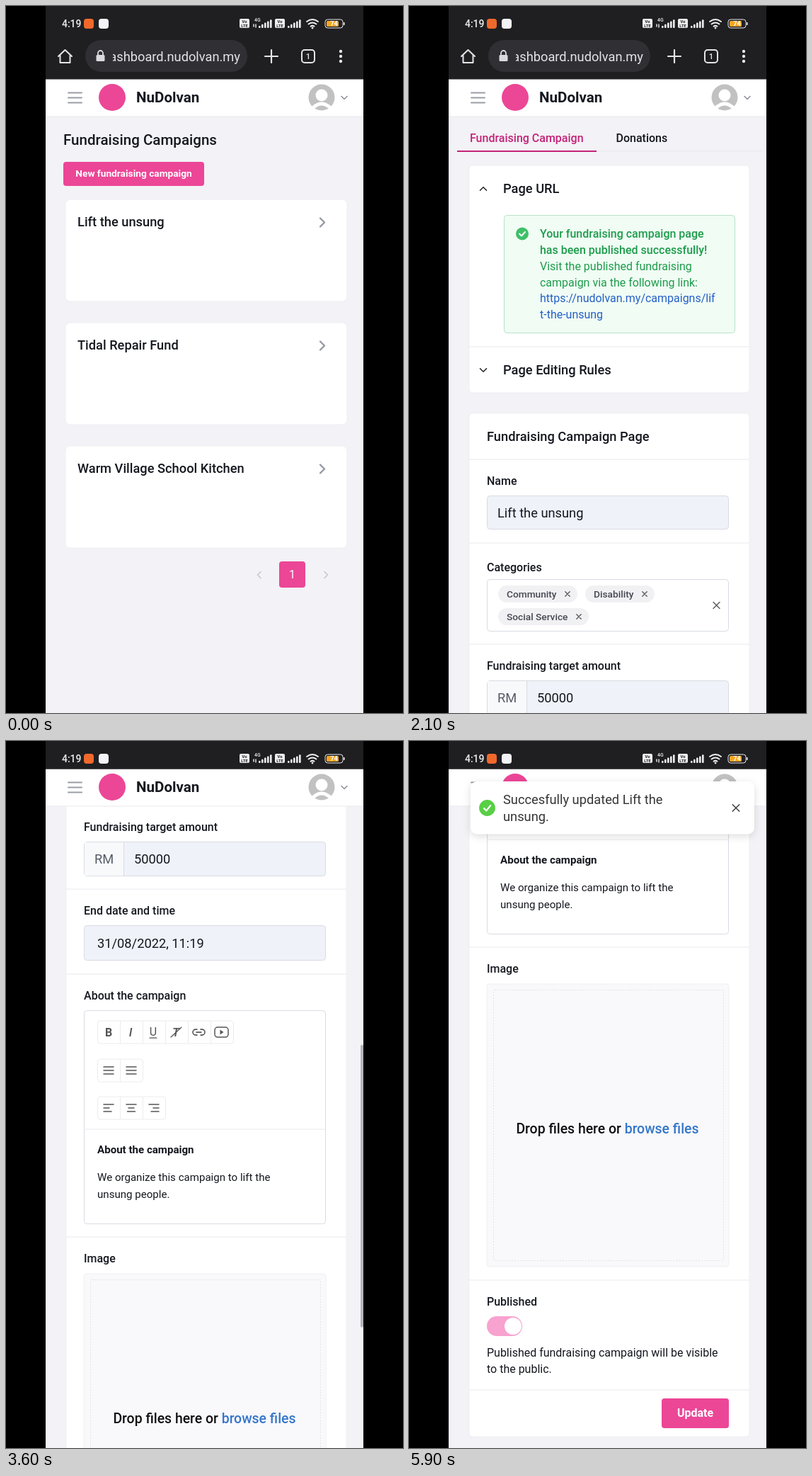
An HTML page for the animation above (6 s loop, 561 by 998 pixels).

```html
<!DOCTYPE html>
<html lang="en">
<head>
<meta charset="utf-8">
<style>
  html, body { margin: 0; height: 100%; overflow: hidden; background: #000; }
  svg { display: block; font-family: Roboto, sans-serif; }
  #toast rect { filter: drop-shadow(0 3px 6px #0002); }
</style>
</head>
<body>
<svg id="stage" width="561" height="998" viewBox="0 0 561 998"></svg>
<script>
const K = 449 / 393;              // stage pixels per page pixel
const INK = '#15181f', PINK = '#ec4697', LINE = '#e9e9ee', FIELD = '#eff2f8';
const LOOP = 6000, BODY = 191, BAR = 64;

// Shapes: y of a text is the middle of its capitals.
const text = (x, y, s, size = 14, weight = 400, fill = INK, anchor = 'start') =>
  `<text x="${x}" y="${y + .355 * size * K}" font-size="${size * K}" font-weight="${weight}" fill="${fill}" text-anchor="${anchor}">${s}</text>`;
const rect = (x, y, w, h, fill, r = 0, stroke = 'none', extra = '') =>
  `<rect x="${x}" y="${y}" width="${w}" height="${h}" rx="${r}" fill="${fill}" stroke="${stroke}" ${extra}/>`;
const path = (d, stroke, width = 1.6, extra = '') =>
  `<path d="${d}" fill="none" stroke="${stroke}" stroke-width="${width}" stroke-linecap="round" stroke-linejoin="round" ${extra}/>`;
const circle = (x, y, r, fill, extra = '') => `<circle cx="${x}" cy="${y}" r="${r}" fill="${fill}" ${extra}/>`;
const group = (id, inner, extra = '') => `<g id="${id}" ${extra}>${inner}</g>`;
const rule = (y, x = 84, w = 397) => rect(x, y - .5, w, 1, LINE);
const cross = (x, y, r, color = '#555') => path(`M${x - r} ${y - r}l${2 * r} ${2 * r}m0 ${-2 * r}l${-2 * r} ${2 * r}`, color, 1.3);
const label = (y, s) => text(110, y, s, 14, 500);
const field = (y, h, fill = FIELD) => rect(110.5, y + .5, 341, h, fill, 4, '#d8dbe2');
const lines = (x, y, step, list, ...style) => list.map((s, i) => text(x, y + i * step, s, ...style)).join('');

function statusBar() {
  const volte = x => rect(x, 18, 14, 13, '#eee', 2) +
    text(x + 7, 21.8, 'Vo', 5, 700, '#1f1f22', 'middle') + text(x + 7, 27.6, 'LTE', 5, 700, '#1f1f22', 'middle');
  const bars = x => [0, 1, 2, 3, 4].map(i => rect(x + i * 4, 28 - i * 2.2, 2.6, 3 + i * 2.2, '#eee', 1)).join('');
  return rect(56, 0, 449, 39.5, '#1f1f22') + text(79, 25, '4:19', 12.2, 500, '#eee') +
    rect(110, 18, 14, 14, '#f0692b', 4) + rect(131, 18, 14, 14, '#f4f4f8', 4) +
    volte(330) + text(351, 20, '4G', 6, 500, '#eee') + path('M350 29v-3m3 0v4', '#eee', 1.4) + bars(357) +
    volte(380) + bars(398) +
    path('M425 22q8-6 16 0m-13.500 3.500q5.500-4 11 0m-8 3.200q2.500-2 5 0', '#eee', 2) + circle(433, 31, 1.4, '#eee') +
    rect(451, 19, 25, 12, 'none', 3.5, '#eee') + rect(453, 21, 17, 8, '#f5a623', 1.5) + rect(477, 23, 1.5, 4, '#eee') +
    text(463.5, 25, '74', 8, 700, '#fff', 'middle');
}

function addressBar() {
  return rect(56, 39, 449, 64.5, '#1f1f22') + rect(112, 48, 229, 45, '#303034', 22.5) +
    path('M74 71l9.500-9 9.500 9M76.500 69.500v10.500h14v-10.500', '#e4e4e8', 2) +
    rect(127.500, 69, 12, 9, '#dadade', 1.5) + path('M130 69v-2.500a3.500 3.500 0 0 1 7 0v2.500', '#dadade', 1.8) +
    `<svg x="151" y="48" width="185" height="45">${text(180, 24, 'dashboard.nudolvan.my', 16, 400, '#e4e4e8', 'end')}</svg>` +
    path('M366 71h18m-9-9v18', '#e4e4e8', 2.2) +
    rect(418, 62, 18, 18, 'none', 4, '#e4e4e8', 'stroke-width="2"') + text(427, 71, '1', 10, 500, '#e4e4e8', 'middle') +
    [64, 71, 78].map(y => circle(473, y, 2.2, '#e4e4e8')).join('');
}

function header() {
  return rect(56, 0, 449, 53, '#fff') + rule(53, 56, 449) +
    path('M88 19.500h19m-19 7h19m-19 7h19', '#9a9da6', 2) + circle(150, 26, 19, PINK) +
    text(184, 26, 'NuDolvan', 18, 700) +
    circle(446, 26, 18.5, '#c1c1c1') + circle(446, 23, 8.5, '#fff') + path('M435 39.500q11-9 22 0', '#fff', 5) +
    path('M474 24.500l4 4 4-4', '#8f929b');
}

function list() {
  const card = (s, i) => {
    const y = 170 + 174 * i;
    return rect(84, y, 398, 144, '#fff', 7, '#efeff3') + text(101, y + 32, s, 16, 500) +
      path(`M444 ${y + 26.500}l6 6-6 6`, '#9599a3', 2.4);
  };
  return text(81, 86, 'Fundraising Campaigns', 18, 500) + rect(81, 117, 199, 34, PINK, 4) +
    text(180.5, 133.5, 'New fundraising campaign', 12, 700, '#fff', 'middle') +
    ['Lift the unsung', 'Tidal Repair Fund', 'Warm Village School Kitchen'].map(card).join('') +
    path('M360 695.500l-4.500 4.500 4.500 4.500M450 695.500l4.500 4.500-4.500 4.500', '#c4c4cc', 1.4) +
    rect(386, 681, 37, 37, PINK, 4) + text(404.5, 699.5, '1', 14, 400, '#fff', 'middle');
}

function panels() {
  const row = (n, title) => path('M-4.500 -2.200L0 2.200 4.500 -2.200', '#222', 1.5, `id="arrow${n}"`) +
    group('title' + n, text(133, 33, title, 16, 500)) + rect(134, 18, 140, 27, '#ededf0', 4, 'none', `id="bone${n}"`);
  const body = (id, inner) => `<svg id="${id}" width="561" height="0">${inner}</svg>`;
  const green = '#1d9c4b', brown = '#985c14';
  return rect(85, 122, 396, 130, '#fff', 5, '#efeff3', 'id="panel"') +
    group('row1', row(1, 'Page URL'), 'transform="translate(0 122)"') +
    `<svg id="body1" y="187" width="561" height="0">` +
      rect(134.5, 5.5, 326, 166, '#f0fcf4', 4, '#b9e3c8') + circle(160, 31.5, 9, '#3fbf68') +
      path('M156 31.500l3 3 5-5.500', '#fff', 2) +
      lines(185, 31.5, 22.85, ['Your fundraising campaign page', 'has been published successfully!'], 14, 500, green) +
      lines(185, 77, 22.85, ['Visit the published fundraising', 'campaign via the following link:'], 14, 400, green) +
      lines(185, 122.5, 22.85, ['https://nudolvan.my/campaigns/lif', 't-the-unsung'], 14, 400, '#2460c8') + `</svg>` +
    group('row2', rule(0) + row(2, 'Page Editing Rules')) +
    body('body2',
      rect(134.5, 5.5, 326, 166, '#fefbe6', 4, '#f2e9b4') +
      '<path d="M160 23l9 16h-18z" fill="#f7bd2a" stroke="#f7bd2a" stroke-width="2" stroke-linejoin="round"/>' +
      path('M160 28v5m0 3.500v.1', '#fff', 2) +
      lines(185, 32, 22.85, ['After the fundraising campaign', 'page is published, you can no longer', 'delete it, unpublish it or edit its:'], 14, 500, brown) +
      lines(207, 100.5, 22.85, ['Name', 'Fundraising target amount', 'End date and time'], 14, 400, brown) +
      [0, 1, 2].map(i => circle(187.5, 101 + i * 22.85, 2.5, brown)).join(''));
}

function editor() {
  const icon = '#555';
  const box = (y, n) => rect(129.5, y - 16, n * 32, 32, '#fff', 4, '#ececf0') +
    Array.from({ length: n - 1 }, (_, i) => rect(161 + i * 32, y - 16, 1, 32, '#ececf0')).join('');
  const stripes = (x, y, widths, align) => path(widths.map((w, i) =>
    `M${x - 7 + (14 - w) * align} ${y - 5 + 5 * i}h${w}`).join(''), icon, 1.5);
  return field(615, 301, '#fff') + box(646, 6) +
    text(145, 646, 'B', 14, 700, icon, 'middle') +
    `<g font-style="italic">${text(176, 646, 'I', 15, 500, icon, 'middle')}${text(240, 646, 'T', 15, 500, icon, 'middle')}</g>` +
    text(208, 645, 'U', 14, 400, icon, 'middle') + path('M203 654h10M233 653l15-14', icon, 1.3) +
    path('M270 642h-2a4 4 0 0 0 0 8h2m5-8h2a4 4 0 0 1 0 8h-2m-6-4h7', icon, 1.6) +
    rect(295, 639, 19, 14, 'none', 4, icon, 'stroke-width="1.5"') + `<path d="M302.500 642.500l5 3.500-5 3.500z" fill="${icon}"/>` +
    box(700, 2) + stripes(145, 700, [14, 14, 14], 0) + stripes(177, 700, [14, 14, 14], 0) +
    box(753, 3) + stripes(145, 753, [14, 8, 11], 0) + stripes(177, 753, [14, 8, 11], .5) + stripes(209, 753, [14, 8, 11], 1) +
    rule(783, 110, 342) + text(129, 812, 'About the campaign', 13.2, 700) +
    lines(129, 850.5, 24.5, ['We organize this campaign to lift the', 'unsung people.'], 13.2);
}

function form() {
  const tag = (x, y, w, s) => rect(x, y - 12, w, 24, '#f1f1f4', 12) + text(x + 12, y, s, 12, 500, '#454852') +
    cross(x + w - 14, y, 3.2);
  return rect(85, 0, 396, 1626, '#fff', 5, '#efeff3') +
    [65, 183, 326, 444, 564, 935, 1405, 1560].map(y => rule(y)).join('') +
    text(110, 33, 'Fundraising Campaign Page', 16, 500) +
    label(95.5, 'Name') + field(116, 47) + text(125, 140.5, 'Lift the unsung', 16) +
    label(217, 'Categories') + field(234, 73, '#fff') + tag(126, 255, 112, 'Community') +
    tag(249, 255, 98, 'Disability') + tag(126, 287, 128, 'Social Service') + cross(434.5, 271, 4.5) +
    label(356.5, 'Fundraising target amount') + field(377, 48) + rect(111, 378, 55, 47, '#f8f9fb') +
    rect(166, 378, 1, 47, '#d8dbe2') + text(125, 401.5, 'RM', 16, 400, '#555b66') + text(181, 401.5, '50000', 16) +
    label(474.5, 'End date and time') + field(495, 49) + text(129, 520.5, '31/08/2022, 11:19', 16) +
    label(594, 'About the campaign') + editor() +
    label(965.5, 'Image') + rect(110, 987, 342, 399, '#f9f8fb', 4, '#f0eff3') +
    rect(119.5, 995.5, 325, 382, 'none', 2, '#e2e2e8', 'stroke-dasharray="2 2"') +
    text(280.5, 1191.5, 'Drop files here or <tspan fill="#3577c9">browse files</tspan>', 17, 500, '#111', 'middle') +
    label(1435.5, 'Published') + rect(110, 1456, 50, 28, '#f8a2d0', 14) + circle(147, 1470, 12, '#fff') +
    lines(110, 1507, 23, ['Published fundraising campaign will be visible', 'to the public.']) +
    rect(357, 1572, 95, 42, PINK, 4) + text(404.5, 1592.5, 'Update', 14, 700, '#fff', 'middle');
}

const tabs = rule(102, 68, 431) + rect(68, 101, 197, 2, '#c42277') +
  text(86, 83, 'Fundraising Campaign', 14, 500, '#c42277') + text(292.5, 83, 'Donations', 14, 500);
const toast = rect(87, 57, 401, 74.5, '#fff', 9) + circle(110.5, 94.5, 11.4, '#58cf45') +
  path('M106 95l3.200 3.500 6-7.500', '#fff', 2.2) +
  lines(133, 83, 23.8, ['Succesfully updated Lift the', 'unsung.'], 16, 400, '#363636') + cross(462, 94.5, 4.8, '#333');

stage.innerHTML = rect(56, 0, 449, 998, '#f3f2f6') + group('listPage', list()) +
  group('formPage', tabs + panels() + group('card', form())) + group('top', header()) +
  rect(56, 102, 0, 3, PINK, 0, 'none', 'id="progress"') + rect(501, 0, 4, 399, '#b4b4ba', 2, 'none', 'id="thumb"') +
  group('toast', toast) + group('address', addressBar()) + statusBar() +
  circle(0, 0, 12.5, '#ffffffd0', 'id="touch" stroke="#c9c9e2" stroke-width="1.8"');

const $ = id => document.getElementById(id);
const set = (id, name, value) => $(id).setAttribute(name, value);
const move = (id, x, y, rest = '') => set(id, 'transform', `translate(${x} ${y}) ${rest}`);
const show = (id, on) => set(id, 'visibility', on ? 'visible' : 'hidden');
const ramp = (t, a, b) => Math.min(1, Math.max(0, (t - a) / (b - a)));
const smooth = p => p * p * (3 - 2 * p);

const SWIPES = [[2500, 0], [2900, 250], [3100, 441], [3600, 1000], [4000, 1360], [4100, 1394], [4200, 1410]];
function travel(t) {
  let y = 0;
  for (let i = 1; i < SWIPES.length; i++) {
    const [t0, y0] = SWIPES[i - 1], [t1, y1] = SWIPES[i];
    y += (y1 - y0) * ramp(t, t0, t1);
  }
  return y;
}

// cubic-bezier(.21, 1.02, .73, 1), solved by bisection
function toastEase(x) {
  const curve = (s, a, b) => 3 * (1 - s) ** 2 * s * a + 3 * (1 - s) * s * s * b + s ** 3;
  let lo = 0, hi = 1;
  for (let i = 0; i < 20; i++) {
    const mid = (lo + hi) / 2;
    if (curve(mid, .21, .73) < x) lo = mid; else hi = mid;
  }
  return curve(lo, 1.02, 1);
}

function draw(t) {
  const loaded = t >= 1300, onForm = t >= 600;
  const moved = travel(t), hidden = Math.min(BAR, moved), top = 103 - hidden;
  const open = [smooth(ramp(t, 1650, 1850)), smooth(ramp(t, 2300, 2480))];

  set('listPage', 'display', onForm ? 'none' : 'inline');
  set('formPage', 'display', onForm ? 'inline' : 'none');
  move('listPage', 0, 103);
  move('formPage', 0, 103 - moved);
  move('top', 0, top);
  move('address', 0, -hidden);

  const row2 = 187 + BODY * open[0], extra = BODY * (open[0] + open[1]);
  set('panel', 'height', 130 + extra);
  move('row2', 0, row2);
  set('body2', 'y', row2 + 65);
  move('card', 0, 281 + extra);
  set('card', 'opacity', loaded ? 1 : .42);
  open.forEach((e, i) => {
    const n = i + 1;
    set('body' + n, 'height', BODY * e);
    move('arrow' + n, 105, 33, `scale(1 ${1 - 2 * e})`);
    set('title' + n, 'display', loaded ? 'inline' : 'none');
    set('bone' + n, 'display', loaded ? 'none' : 'inline');
  });

  show('progress', t >= 700 && !loaded);
  set('progress', 'width', 449 * ramp(t, 700, 1700));
  show('thumb', t >= 2500 && t < 4600);
  set('thumb', 'y', top + (moved - hidden) / 2305 * 959);

  const first = t < 3500, start = first ? 3100 : 4100;
  show('touch', Math.abs(t - start) <= 100);
  move('touch', first ? 314 : 324, (first ? 553 : 671) + travel(start) - moved);

  const p = toastEase(ramp(t, 4934, 5284));
  show('toast', t >= 4934);
  set('toast', 'opacity', .5 + .5 * p);
  move('toast', 287.5, 94.25 - 149 * (1 - p), `scale(${.6 + .4 * p}) translate(-287.5 -94.25)`);
}

const begin = performance.now();
function tick() {
  draw((performance.now() - begin) % LOOP);
  requestAnimationFrame(tick);
}
tick();
</script>
</body>
</html>
```
